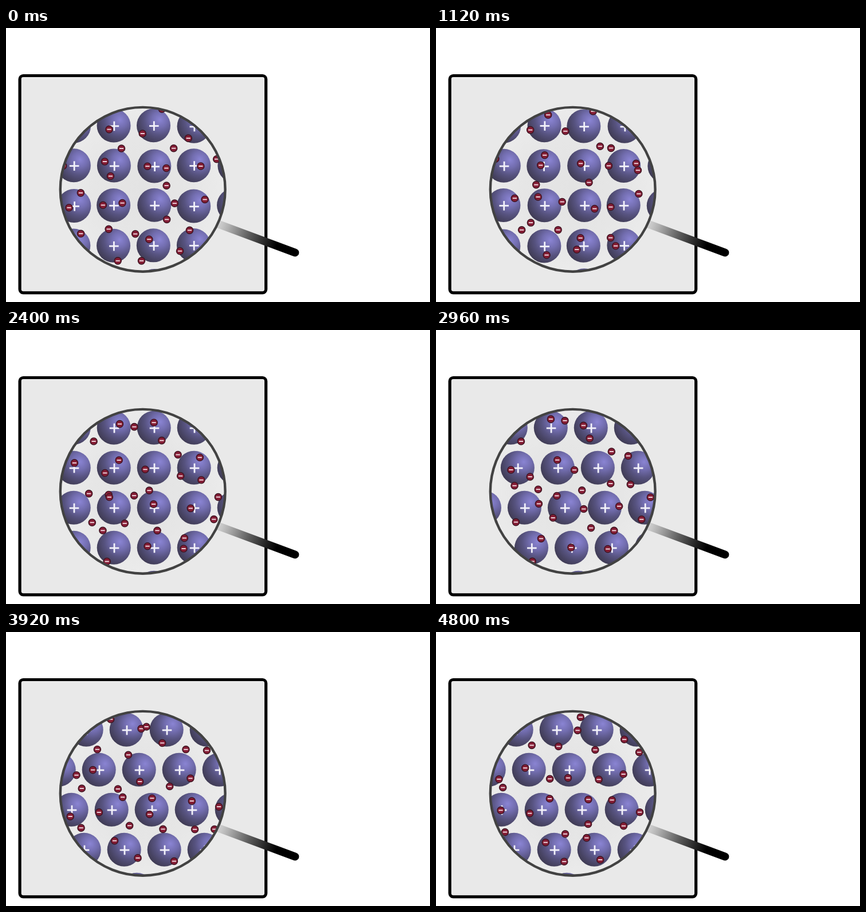
An HTML page with a canvas for the animation above (4.88 s loop, 740x480 px).

```html
<!DOCTYPE html>
<html lang="en">
<head>
<meta charset="utf-8">
<title>Metallic bonding: layers sliding</title>
<style>
  html, body { margin: 0; width: 100%; height: 100%; overflow: hidden; background: #fff; }
  canvas { display: block; }
</style>
</head>
<body>
<canvas id="stage" width="740" height="480"></canvas>
<script>
const ctx = document.getElementById('stage').getContext('2d');
const LOOP = 4880, STEP = 80;
const LENS = { x: 238.7, y: 282.8, r: 143.9 };
const ION_R = 29.5, GAP = 70;
const VIBRATION_END = 2080, SLIDE_START = 2400, SLIDE_END = 3420, SLIDE = 22;
const ELECTRONS = 31, GOLDEN_ANGLE = Math.PI * (3 - Math.sqrt(5));

const clamp = v => Math.max(0, Math.min(1, v));

function noise(seed) {
  const v = Math.sin(seed * 12.9898) * 43758.5453;
  return v - Math.floor(v);
}

function disc(x, y, r) {
  ctx.beginPath();
  ctx.arc(x, y, r, 0, Math.PI * 2);
}

function gradient(g, stops) {
  stops.forEach(([at, color]) => g.addColorStop(at, color));
  return g;
}

function drawPlate() {
  ctx.fillStyle = '#fff';
  ctx.fillRect(0, 0, 740, 480);
  ctx.beginPath();
  ctx.roundRect(24.1, 83.5, 429.6, 380.3, 6);
  ctx.fillStyle = '#e9e9e9';
  ctx.fill();
  ctx.strokeStyle = '#000';
  ctx.lineWidth = 5.2;
  ctx.stroke();
}

function drawHandle() {
  ctx.strokeStyle = gradient(ctx.createLinearGradient(372, 344, 472, 382),
    [[0, '#cfcfcf'], [0.15, '#b2b2b2'], [0.5, '#606060'], [1, '#000']]);
  ctx.lineWidth = 14;
  ctx.lineCap = 'round';
  ctx.beginPath();
  ctx.moveTo(372, 344);
  ctx.lineTo(504.5, 393.5);
  ctx.stroke();
}

function drawIon(x, y) {
  ctx.fillStyle = gradient(ctx.createRadialGradient(x + 10, y - 11, 0, x + 10, y - 11, 45),
    [[0, '#8a84d3'], [0.3, '#736eb0'], [0.6, '#575380'], [0.85, '#474362'], [1, '#3e3a52']]);
  disc(x - 0.8, y - 0.8, ION_R);
  ctx.fill();
  ctx.fillStyle = '#f3f2fa';
  ctx.fillRect(x - 8.3, y - 1.4, 16.6, 2.8);
  ctx.fillRect(x - 1.4, y - 8.3, 2.8, 16.6);
}

function drawIons(t) {
  const slide = SLIDE * clamp((t - SLIDE_START) / (SLIDE_END - SLIDE_START));
  const shake = t < VIBRATION_END ? 2 : 0;
  for (let row = 1; row <= 5; row++) {
    for (let col = -3; col <= 4; col++) {
      const seed = t / STEP * 97 + row * 17 + col * 5;
      drawIon(
        119 + col * GAP + row * slide + shake * (noise(seed + 1) - 0.5),
        102 + row * GAP + shake * (noise(seed + 2.5) - 0.5));
    }
  }
}

function drawElectron(x, y) {
  disc(x, y, 6.1);
  ctx.fillStyle = '#851d35';
  ctx.fill();
  ctx.strokeStyle = '#3c1420';
  ctx.lineWidth = 1.4;
  ctx.stroke();
  ctx.fillStyle = '#ecd3da';
  ctx.fillRect(x - 3.6, y - 1, 7.2, 2);
}

// Slow, irregular wandering: a broad sweep with a quicker wobble on top.
function wander(seed, u) {
  const broad = 13 * Math.sin(5 * u + 6.28 * noise(seed));
  const quick = 4 * Math.sin((16 + 10 * noise(seed + 7)) * u + 6.28 * noise(seed + 3));
  return broad + quick;
}

// A sunflower spiral spreads the electrons over the lens; noise loosens it.
function drawElectrons(t) {
  const u = t / LOOP;
  for (let i = 0; i < ELECTRONS; i++) {
    const reach = LENS.r * Math.sqrt((i + 0.5) / ELECTRONS);
    const angle = i * GOLDEN_ANGLE;
    drawElectron(
      LENS.x + reach * Math.cos(angle) + 16 * (noise(i + 1) - 0.5) + wander(i + 100, u),
      LENS.y + reach * Math.sin(angle) + 16 * (noise(i + 50) - 0.5) + wander(i + 200, u));
  }
}

function drawLens(t) {
  const { x, y, r } = LENS;
  ctx.save();
  disc(x, y, r);
  ctx.clip();
  ctx.fillStyle = gradient(ctx.createRadialGradient(x, y, 0, x, y, r),
    [[0, '#e3e3e3'], [0.6, '#e6e6e6'], [1, '#ebebeb']]);
  ctx.fillRect(x - r, y - r, 2 * r, 2 * r);
  drawIons(t);
  drawElectrons(t);
  ctx.restore();
  disc(x, y, r);
  ctx.strokeStyle = '#424242';
  ctx.lineWidth = 4.4;
  ctx.stroke();
}

function draw(now) {
  const t = Math.floor((now % LOOP) / STEP) * STEP;
  drawPlate();
  drawHandle();
  drawLens(t);
}

let start;
function tick(now) {
  start ??= now;
  draw(now - start);
  requestAnimationFrame(tick);
}
draw(0);
requestAnimationFrame(tick);
</script>
</body>
</html>
```
